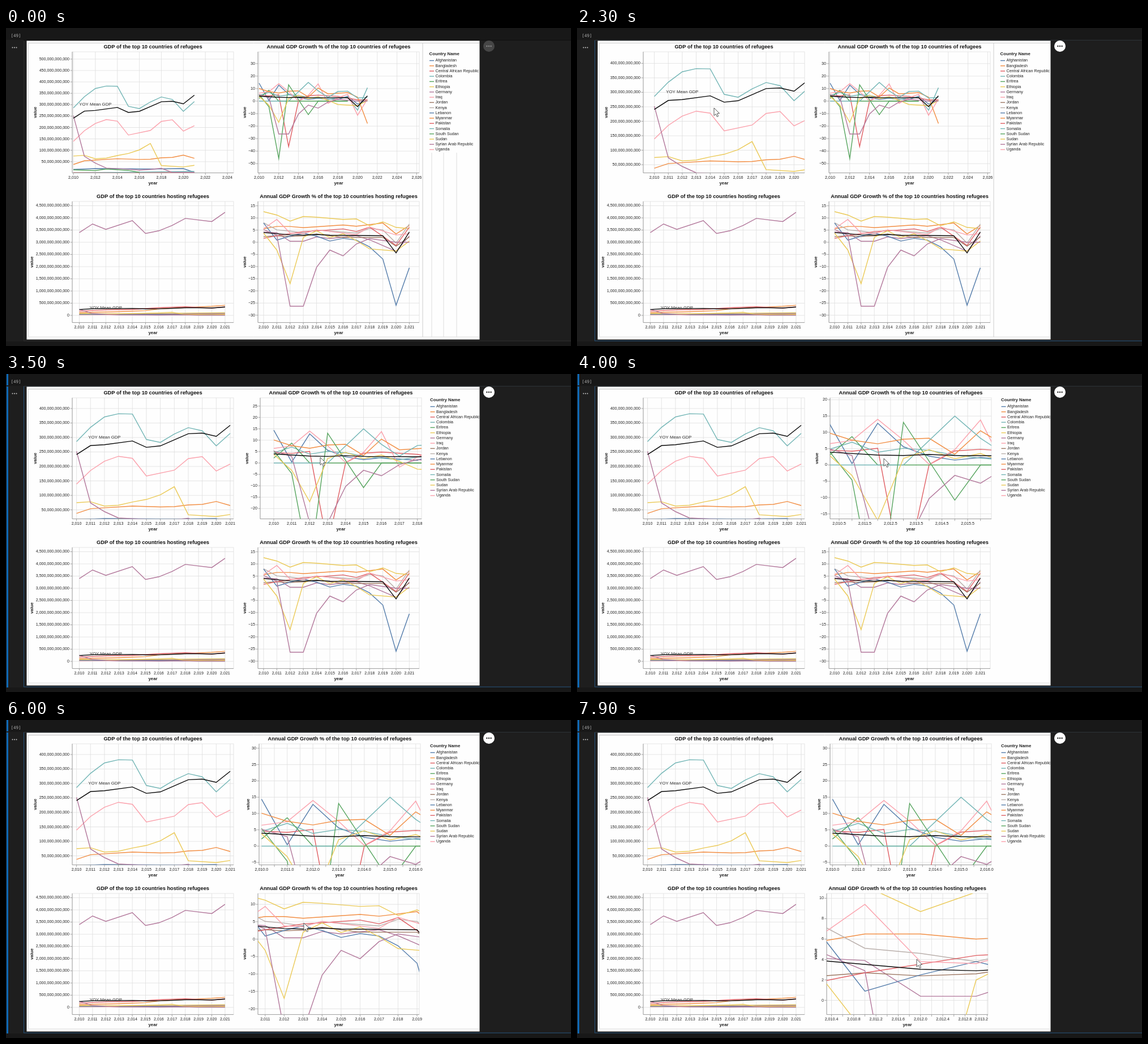
Animation, 998 px wide and 561 px high, one loop 8 s. Source, as an HTML page with a canvas:

```html
<!DOCTYPE html>
<html lang="en">
<head>
<meta charset="utf-8">
<title>Linked GDP charts</title>
<style>
html, body { margin: 0; width: 100%; height: 100%; overflow: hidden; background: #1e1e1e; }
canvas { display: block; }
</style>
</head>
<body>
<canvas id="stage" width="998" height="561"></canvas>
<script>
const g = document.getElementById('stage').getContext('2d');
const W = 285, H = 213.6, LOOP = 8000, STEP = 100, FONT = 7.12;
const SANS = '"Liberation Sans", Arial, sans-serif';
const HUES = ['#557dab', '#f28f45', '#e05f64', '#74b6b6', '#57a55f', '#ebca58', '#b3799c', '#fba1ac', '#9d7864', '#bab0ac'];
const [BLUE, ORANGE, RED, TEAL, GREEN, YELLOW, PURPLE, PINK, BROWN, GREY] = HUES;
const BLACK = '#0a0a0a';
const COUNTRIES = ['Afghanistan', 'Bangladesh', 'Central African Republic', 'Colombia', 'Eritrea', 'Ethiopia',
  'Germany', 'Iraq', 'Jordan', 'Kenya', 'Lebanon', 'Myanmar', 'Pakistan', 'Somalia', 'South Sudan', 'Sudan',
  'Syrian Arab Republic', 'Uganda'];

// Yearly key points from 2010; a gap is bridged by a straight line.
function ramp(color, from, to) {
  const values = [from];
  values[11] = to;
  return [color, values];
}
const sharedGdp = [
  [YELLOW, [75, 78, 63, 66, 77, 86, 102, 130, 33, , 27, 34]],
  [PURPLE, [252, 74, 44, 22, , 17, 13, 16, 21, 3, , 3]],
  [BLACK, [241, 272, 275, , 288, 266, 271, 292, 313, 315, 304, 342]]];
const sharedGrowth = [
  [YELLOW, [3.8, -3.2, -17, 2, 4.7, 1.9, 3.5, .7, -2.7, , -3.6, .5]],
  [PURPLE, [5.2, 2.9, -26.3, -26.3, -10.3, -3.2, -5.6, -.7, 1.5, , 0, 0]],
  [BLACK, [4, , 3.05, 2.9, 3.2, 2.9, , , , 2.7, -4.4, 4.2]]];

// x0, kx: place of 2010 and pixels per year; y0, ky: place of zero and pixels per unit.
const charts = [
  { title: 'GDP of the top 10 countries of refugees', left: 117, top: 42, x0: 119, kx: 19.43, y0: 256, ky: .4022, gdp: true,
    lines: [
      [BLUE, [16, , 20, , , , , 18, , , 20, 3]],
      ramp(RED, 2, 2.5),
      ramp(TEAL, 1, 7.6),
      [TEAL, [286, 335, 371, 382, 381, 293, 283, 312, 334, 323, 271, 314]],
      [PINK, [139, 186, 218, 235, 228, 167, , 187, 227, 234, 184, 208]],
      [ORANGE, [38, 54, , , 63, , 60, 61, 67, 69, 79, 65]],
      [GREEN, [14.5, , 11.4, 18, , 12, 3]],
      ...sharedGdp] },
  { title: 'Annual GDP Growth % of the top 10 countries of refugees', left: 445, top: 42, x0: 447, kx: 17.4, y0: 129, ky: 2.205,
    lines: [
      [BLUE, [14.4, .4, 12.8, 5.6, 2.7, 1.5, 2.3, , 1.2, 3.9, -2.4, .8]],
      [RED, [4.6, 4.2, 5.1, -36.4, .1, 4.3, 4.8, , 3.8, , 1, 1]],
      [TEAL, [4.5, 7, 3.9, 5.1, 4.5, 3, 2.1, 1.4, 2.6, 3.2, -7.3, 10.7]],
      [GREEN, [2.2, 8.7, 0, , , , , , , 0]],
      [PINK, [6.4, 7.5, 14, 7.6, .2, 4.7, 13.8, -1.8, 2.6, 5.5, -11.3, 1.6]],
      [ORANGE, [10.1, 7.6, 6.5, 7.9, 8.2, 3.3, 10.5, 5.8, , 6.8, 3.2, -17.9]],
      [TEAL, [0, , , 0, , 15, 8.2, 3, 7.7, 8, 2.5, 3]],
      [GREEN, [5.4, -4.6, -46, 13.1, , -10.8, 0, , , 0]],
      ...sharedGrowth] },
  { title: 'GDP of the top 10 countries hosting refugees', left: 117, top: 306, x0: 129.5, kx: 23.4, y0: 507, ky: .043, gdp: true,
    lines: [
      [PURPLE, [3400, 3750, 3530, , 3890, 3360, 3470, 3690, 3980, , 3850, 4230]],
      [ORANGE, [115, , , 150, , 195, 265, 294, , , 374, 416]],
      [RED, [177, , 224, , 244, , 314, , 356, , 300, 348]],
      ...[YELLOW, GREY, BROWN, PINK].map((color, i) => ramp(color, 42 - 5 * i, 110 - 23 * i)),
      ramp(BLUE, 45, 25),
      ...sharedGdp] },
  { title: 'Annual GDP Growth % of the top 10 countries hosting refugees', left: 445, top: 306, x0: 455, kx: 23.4, y0: 378, ky: 4.29,
    lines: [
      [ORANGE, [5.6, 6.5, 6.5, 6, , , 7.1, 6.6, , 7.9, 3.4, 6.9]],
      [YELLOW, [12.6, 11.2, 8.7, 10.6, 10.3, , 9.4, 9.6, 6.8, 8.4, 6.1, 5.6]],
      [PURPLE, [4.2, 3.9, .4, .4, 2.2, 1.5, , 2.7, 1, , -3.7, 2.6]],
      [BROWN, [2.3, 2.7, 2.4, 2.6, 3.4, , 2, , , 2, -1.6, 2.2]],
      [GREY, [8, 5.1, 4.6, 3.8, 5, , , 3.8, 5.7, 5.1, -.3, 7.5]],
      [BLUE, [7.9, .9, 2.5, 3.8, 2.5, .5, 1.6, .9, -1.9, -6.9, -25.9, -10.5]],
      [RED, [1.6, 2.7, , 4.4, 4.7, , 5.5, 4.4, 6.2, 2.5, -1.3, 6.2]],
      [PINK, [5.6, 9.4, 3.8, 3.6, 5.1, , , 3.1, 6.3, , 3, 3.5]],
      ...sharedGrowth] }
];

// The user's gestures. A drag carries its chart along; a zoom is anchored at the pointer.
const move = (from, to, x, y, chart) => ({ from, to, x, y, chart });
const zoom = (from, to, chart, factor, shift = 0) => ({ from, to, chart, factor, shift });
const gestures = [
  move(400, 1000, 202, 157),
  zoom(1400, 1600, 0, 1.27),
  move(1700, 2300, 242, 141, 0),
  move(2300, 2500, 230, 139.5, 0),
  move(2600, 2900, 496, 123.5),
  zoom(2900, 3200, 1, 1.822, 4),
  move(3200, 3500, 555, 147, 1),
  move(3500, 3600, 542, 149),
  zoom(3600, 4000, 1, 1.432, -2),
  move(4000, 4700, 553, 211, 1),
  move(5200, 5600, 526, 358),
  zoom(5600, 6000, 3, 1.433),
  move(6100, 6200, 493, 357),
  zoom(6200, 6300, 3, 1.127, -4),
  move(6300, 6500, 507, 406, 3),
  move(6700, 7000, 521, 455, 3),
  move(7000, 7100, 512, 460.5),
  zoom(7100, 7500, 3, 2.6),
  move(7500, 7900, 600, 422, 3)
];

function stateAt(t) {
  const views = charts.map(c => ({ ...c })), mouse = { x: 998, y: 12 };
  for (const e of gestures) {
    if (t <= e.from) break;
    const p = Math.min(1, (t - e.from) / (e.to - e.from)), v = views[e.chart];
    if (e.factor) {
      const k = 1 + (e.factor - 1) * p;
      v.left += e.shift;
      v.x0 = mouse.x - (mouse.x - v.x0 - e.shift) * k;
      v.y0 = mouse.y - (mouse.y - v.y0) * k;
      v.kx *= k;
      v.ky *= k;
    } else {
      const dx = (e.x - mouse.x) * p, dy = (e.y - mouse.y) * p;
      mouse.x += dx;
      mouse.y += dy;
      if (v) {
        v.x0 += dx;
        v.y0 += dy;
      }
    }
  }
  return { views, mouse };
}

function rect(x, y, w, h, color) {
  g.fillStyle = color;
  g.fillRect(x, y, w, h);
}

function line(x1, y1, x2, y2, color, width = .75) {
  g.strokeStyle = color;
  g.lineWidth = width;
  g.beginPath();
  g.moveTo(x1, y1);
  g.lineTo(x2, y2);
  g.stroke();
}

function text(s, x, y, size = FONT, align = 'center', bold = false, color = '#222') {
  g.font = `${bold ? 'bold ' : ''}${size}px ${SANS}`;
  g.textAlign = align;
  g.textBaseline = 'middle';
  g.fillStyle = color;
  g.fillText(s, x, y);
  return g.measureText(s).width;
}

function ticks(from, to, count) {
  const raw = (to - from) / count, base = 10 ** Math.floor(Math.log10(raw)), e = raw / base;
  const step = base * (e >= Math.sqrt(50) ? 10 : e >= Math.sqrt(10) ? 5 : e >= Math.SQRT2 ? 2 : 1);
  const out = [];
  for (let i = Math.ceil(from / step); i <= to / step; i++) out.push(i * step);
  return { step, out };
}

function format(v, step) {
  const digits = Math.max(0, -Math.floor(Math.log10(step) + 1e-9));
  const s = Math.abs(v).toLocaleString('en-US', { minimumFractionDigits: digits, maximumFractionDigits: digits });
  return v < 0 ? '\u2212' + s : s;
}

function drawChart(c) {
  const { left, top, x0, kx, y0, ky } = c, right = left + W, bottom = top + H;
  const px = year => x0 + (year - 2010) * kx, py = v => y0 - v * ky;
  const xs = ticks(2010 + (left - x0) / kx, 2010 + (right - x0) / kx, 10);
  const ys = ticks((y0 - bottom) / ky, (y0 - top) / ky, 8);

  for (const v of xs.out) {
    line(px(v), top, px(v), bottom, '#ddd');
    line(px(v), bottom, px(v), bottom + 3.6, '#888');
  }
  let labelWidth = 0;
  for (const v of ys.out) {
    line(left, py(v), right, py(v), '#ddd');
    line(left - 3.6, py(v), left, py(v), '#888');
    const label = format(c.gdp ? v * 1e9 : v, ys.step);
    labelWidth = Math.max(labelWidth, text(label, left - 5, py(v), FONT, 'right'));
  }
  g.strokeStyle = '#ddd';
  g.strokeRect(left, top, W, H);
  line(left, top, left, bottom, '#888');
  line(left, bottom, right, bottom, '#888');

  const room = (xs.step < 1 ? 3.34 : 2.5) * FONT;
  let skip = 1;
  while (kx * xs.step * skip < room) skip *= 2;
  xs.out.filter((v, i) => i % skip === 0).forEach(v => {
    const flush = right - px(v) < 1.6;
    text(format(v, xs.step), flush ? right : px(v), bottom + 8.2, FONT, flush ? 'right' : 'center');
  });

  g.save();
  g.beginPath();
  g.rect(left, top, W, H);
  g.clip();
  g.lineWidth = 1.42;
  for (const [color, values] of c.lines) {
    g.strokeStyle = color;
    g.beginPath();
    values.forEach((v, i) => g.lineTo(px(2010 + i), py(v)));
    g.stroke();
  }
  if (c.gdp) text('YOY Mean GDP', px(2012), py(301), 7.8, 'center', false, '#333');
  g.restore();

  text(c.title, left + W / 2, top - 8.5, 9.26, 'center', true, '#111');
  text('year', left + W / 2, bottom + 18.5, 7.8, 'center', true);
  g.save();
  g.translate(left - labelWidth - 11.5, top + H / 2);
  g.rotate(-Math.PI / 2);
  text('value', 0, 0, 7.8, 'center', true);
  g.restore();
}

function drawLegend(t) {
  const x = t < 3000 ? 747.5 : 749;
  text('Country Name', x, 45.5, 7.8, 'left', true);
  COUNTRIES.forEach((name, i) => {
    const y = 57.5 + i * 9.235;
    line(x + .5, y, x + 8.5, y, HUES[i % 10], 1.42);
    text(name, x + 11, y, FONT, 'left');
  });
}

function dots(x, y, gap, r, color) {
  g.fillStyle = color;
  for (let i = -1; i < 2; i++) {
    g.beginPath();
    g.arc(x + i * gap, y, r, 0, 7);
    g.fill();
  }
}

function drawEditor(t) {
  rect(0, 0, 998, 561, '#1e1e1e');
  rect(0, 0, 998, 21, '#181818');
  rect(0, 553, 998, 8, '#181818');
  const edge = t < 1800 ? '#2c2c2c' : '#24527c';
  line(31, 21.5, 998, 21.5, t < 1800 ? '#101010' : '#2d3338', 1);
  line(31.5, 22, 31.5, 552, edge, 1);
  line(31, 552, 998, 552, edge, 1);
  if (t >= 2700) {
    rect(1, 0, 3, 20, '#0e6ab8');
    rect(1, 22, 3, 531, '#0e6ab8');
  }
  g.font = '7.5px "DejaVu Sans Mono", monospace';
  g.textAlign = 'center';
  g.textBaseline = 'middle';
  g.fillStyle = '#aaa';
  g.fillText('[49]', 17.5, 14);
  dots(15, 34.5, 3.5, 1, '#ccc');

  const lit = t >= 700;
  g.fillStyle = lit ? '#fff' : '#464646';
  g.beginPath();
  g.arc(853, 32, 10, 0, 7);
  g.fill();
  dots(853, 32, 3.6, 1.2, lit ? '#222' : '#8a8a8a');
}

function drawPanel(t) {
  rect(36.5, 22.5, 800, 527, '#fefefe');
  line(39, 26.5, 836, 26.5, t < 2700 ? '#ccc' : '#bbb', 1);
  line(39.5, 27, 39.5, 545, '#d4d4d4', 1);
  line(39, 545, 836, 545, '#ddd', 1);
  if (t < 2700) line(736, 27, 736, 545, '#ccc', 1);
  if (t < 1800) for (const x of [752, 773, 796]) line(x, 220, x, 545, '#ddd', 1);
}

function drawPointer({ x, y }) {
  g.save();
  g.translate(x, y);
  g.beginPath();
  for (const [a, b] of [[0, 0], [0, 13.5], [3.2, 10.7], [5.4, 15.6], [7.6, 14.6], [5.5, 9.9], [9.6, 9.6]]) g.lineTo(a, b);
  g.closePath();
  g.fillStyle = '#fff';
  g.fill();
  g.strokeStyle = '#444';
  g.lineWidth = .9;
  g.stroke();
  g.restore();
}

function draw(t) {
  const { views, mouse } = stateAt(t);
  drawEditor(t);
  g.save();
  g.beginPath();
  g.rect(36, 22, 801, 528);
  g.clip();
  drawPanel(t);
  views.forEach(drawChart);
  drawLegend(t);
  g.restore();
  if (t >= 500) drawPointer(mouse);
}

const start = performance.now();
function tick() {
  const t = (performance.now() - start) % LOOP;
  draw(Math.floor(t / STEP) * STEP);
  requestAnimationFrame(tick);
}
tick();
</script>
</body>
</html>
```
